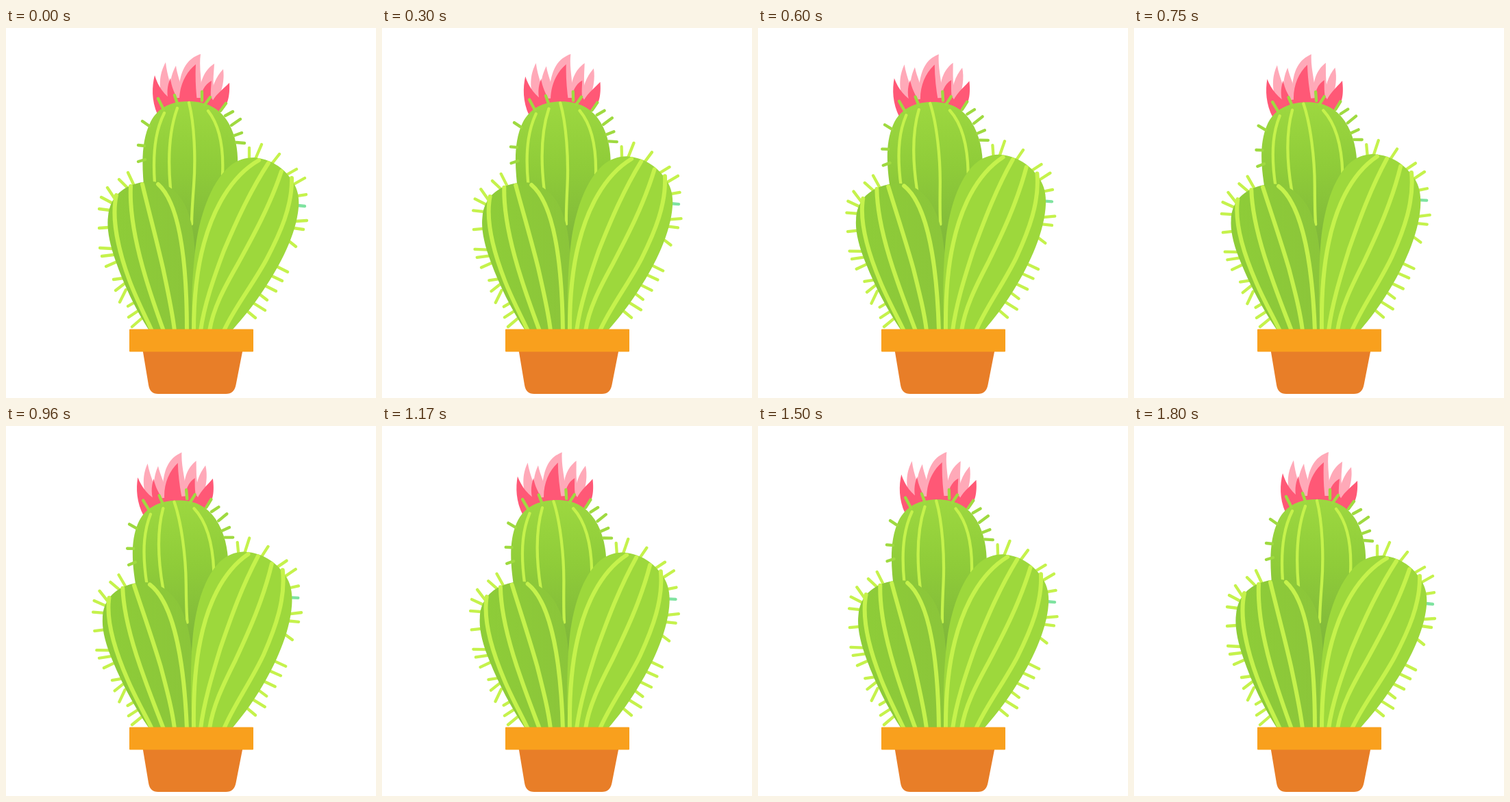
Write an HTML page that moves like this. It is 540 px wide and 540 px high and loops after 1.83 s.

```html
<!DOCTYPE html>
<html lang="en">
<head>
<meta charset="utf-8">
<title>Swaying cactus</title>
<style>
  html, body { margin: 0; height: 100%; overflow: hidden; background: #fff; }
  svg { display: block; width: 100vw; height: 100vh; }
  .line { fill: none; stroke: #c5f24c; stroke-width: 6; stroke-linecap: round; }
  .thin { stroke-width: 4.3; }
  .dark { stroke: #9fda40; }
</style>
</head>
<body>
<svg viewBox="0 0 540 540">
  <defs>
    <linearGradient id="backFill" x2="0" y2="1">
      <stop offset="0" stop-color="#9dd840"/>
      <stop offset=".4" stop-color="#8fcc39"/>
      <stop offset=".9" stop-color="#7fb63a"/>
    </linearGradient>
    <linearGradient id="leftFill">
      <stop offset="0" stop-color="#8ecd38"/>
      <stop offset="1" stop-color="#8bc53a"/>
    </linearGradient>
  </defs>

  <g id="back">
    <g fill="#ffa9b8">
      <path d="M233,50 C225,65 222,80 228,105 L245,105 C242,85 235,70 233,50Z"/>
      <path d="M248,55 C241,68 238,80 240,105 L257,100 C256,80 250,70 248,55Z"/>
      <path d="M284,38 C264,45 253,60 250,105 L285,105 C287,80 281,60 284,38Z"/>
      <path d="M304,52 C289,62 282,78 282,105 L305,100 C301,80 303,70 304,52Z"/>
      <path d="M317,60 C306,72 300,85 298,108 L308,108 C316,90 319,75 317,60Z"/>
    </g>
    <g fill="#ff5876">
      <path d="M217,69 C213,85 212,105 221,126 L247,108 C230,98 222,85 217,69Z"/>
      <path d="M240,73 C235,85 234,95 238,112 L252,108 C246,95 241,85 240,73Z"/>
      <path d="M277,53 C262,65 252,85 253,110 L279,108 C277,90 276,72 277,53Z"/>
      <path d="M300,77 C290,82 284,93 283,110 L300,110 C298,98 299,88 300,77Z"/>
      <path d="M326,80 C316,90 304,98 298,113 L312,123 C324,115 327,98 326,80Z"/>
      <path d="M222,124 L232,102 L300,102 L312,122Z"/>
    </g>
    <path fill="url(#backFill)" d="M202,240 C198,200 197,165 211,137 C224,112 247,107 266,107
      C291,107 312,116 325,139 C337,160 339,185 338,205 L330,300 L275,345 L205,300Z"/>
    <path class="line thin" d="M231,124 C222,142 213,170 217,226 M250,117 C238,150 236,190 240,234
      M267,109 C275,140 277,190 274,230 S271,270 271,286 M295,121 C310,140 318,170 316,214"/>
    <path class="line thin dark" d="M199,136 L209,143 M193,171 L202,172 M193,195 L203,192
      M222,103 L230,119 M246,98 L250,110 M286,93 L286,106 M298,101 L290,112 M321,110 L313,121
      M331,122 L320,128 M342,133 L329,142 M344,153 L333,157 M348,168 L336,167"/>
  </g>

  <g class="lobe">
    <path class="line thin" d="M178,211 L186,228 M165,221 L177,233 M148,233 L158,248 M139,247 L154,255
      M136,264 L152,266 M136,292 L150,291 M137,321 L155,322 M140,333 L157,331 M146,348 L162,341
      M157,367 L172,365 M160,383 L173,373 M166,400 L175,382 M178,406 L190,399 M179,422 L194,412
      M184,436 L199,423"/>
    <path fill="url(#leftFill)" d="M211,224 C238,224 258,245 266,270 C277,300 278,340 276,440 L208,440
      C189,410 172,375 160,340 C150,312 147,290 149,275 C151,245 175,225 211,224Z"/>
    <path class="line" d="M161,244 C153,280 166,330 180,368 C190,395 203,420 213,442
      M182,231 C180,275 192,325 204,365 C213,395 222,420 230,442
      M199,228 C208,266 220,310 229,350 C237,388 243,415 246,442
      M222,228 C249,252 264,320 264,442"/>
  </g>

  <g class="lobe">
    <path class="line thin" d="M355,175 L355,191 M373,170 L364,191 M399,184 L388,198 M424,206 L410,214
      M436,219 L420,228 M438,243 L425,245 M439,281 L423,282 M434,294 L420,292 M423,319 L413,311
      M411,356 L393,347 M403,369 L386,361 M394,384 L376,375 M381,397 L368,387 M378,412 L362,402
      M364,423 L353,414"/>
    <path class="line thin" style="stroke:#7fe3a0" d="M436,260 L426,259"/>
    <path fill="#9dd83c" d="M272,440 C270,400 272,350 278,310 C286,262 303,222 326,202
      C338,192 350,189 362,189 C385,191 405,203 417,222 C427,236 429,250 426,270
      C420,310 395,355 372,388 C357,410 345,424 331,440Z"/>
    <path class="line" d="M369,193 C327,217 302,267 289,314 C278,354 274,400 274,442
      M383,197 C355,240 335,285 318,325 C303,365 289,405 284,442
      M402,209 C385,260 360,305 338,345 C318,380 302,410 297,442
      M417,219 C418,260 400,300 380,338 C360,375 332,410 318,442"/>
  </g>

  <path fill="#e87e28" d="M199.500,470 H345.500 L335.500,521 Q333,534 321,534 H222 Q210,534 208,521Z"/>
  <rect x="180" y="439.500" width="181" height="33" rx="1" fill="#f9a01d"/>
</svg>
<script>
  const STEP = 30, HALF = 900, LOOP = 1830;
  const FOOT = { x: 270, y: 427 };
  const back = document.getElementById('back');
  const parts = [...document.querySelectorAll('.lobe path')]
    .map(el => ({ el, d: el.getAttribute('d') }));

  // Lean a point to the left around the foot, more strongly higher up.
  function bend(x, y, lean) {
    const dx = x - FOOT.x, dy = y - FOOT.y;
    const a = lean * Math.pow(Math.max(0, -dy) / 200, 0.45);
    const c = Math.cos(a), s = Math.sin(a);
    return (FOOT.x + dx * c + dy * s).toFixed(2) + ',' + (FOOT.y - dx * s + dy * c).toFixed(2);
  }

  // Soft ease: mostly steady, slower near the turning points.
  const ease = p => 0.6 * p + 0.2 * (1 - Math.cos(Math.PI * p));

  function draw(now) {
    const t = Math.floor(now % LOOP / STEP) * STEP;
    const sway = ease(1 - Math.abs(1 - t / HALF));
    back.setAttribute('transform', `rotate(${-5.1 * sway} 276 362)`);
    for (const { el, d } of parts)
      el.setAttribute('d', d.replace(/(\d+),(\d+)/g, (_, x, y) => bend(+x, +y, 0.064 * sway)));
  }

  const start = performance.now();
  function frame() {
    draw(performance.now() - start);
    requestAnimationFrame(frame);
  }
  frame();
</script>
</body>
</html>
```
